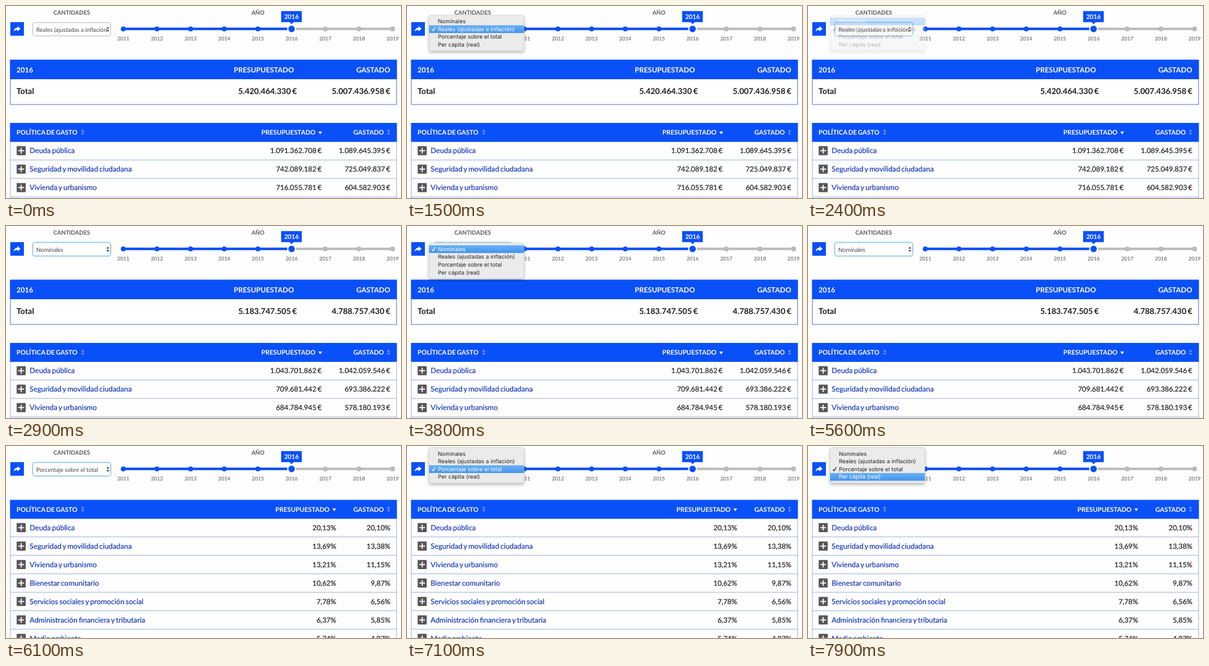
Recreate the animation shown at these times as an HTML page. Size 640x312 px, loop 8 s.

```html
<!DOCTYPE html>
<html lang="es">
<head>
<meta charset="utf-8">
<title>Presupuesto</title>
<style>
  html, body { margin: 0; width: 100%; height: 100%; overflow: hidden; background: #fefefe; }
  svg { display: block; width: 640px; height: 312px; font-family: Lato, sans-serif; text-rendering: geometricPrecision; }
  .table { word-spacing: -.06em; }
  .menu { font-family: Inter, "Liberation Sans", sans-serif; }
</style>
</head>
<body>
<svg id="stage" viewBox="0 0 640 312">
  <defs>
    <linearGradient id="hover" x2="0" y2="1">
      <stop offset="0" stop-color="#69b0f5"/>
      <stop offset="1" stop-color="#4394ee"/>
    </linearGradient>
    <clipPath id="selectClip"><rect x="44" y="27" width="119" height="21"/></clipPath>
    <filter id="shadow" x="-10%" y="-10%" width="120%" height="135%">
      <feDropShadow dx="0" dy="2.5" stdDeviation="2.5" flood-opacity=".3"/>
    </filter>
  </defs>
</svg>
<script>
const BLUE = '#0a50f8', GREY = '#bbb', INK = '#1c1c1c', LINK = '#1738b8';
const LEFT = 6.6, RIGHT = 633.3, WIDTH = RIGHT - LEFT;
const LOOP = 8000, FADE = 150;
const stage = document.getElementById('stage');

function add(parent, tag, attrs = {}, content) {
  const node = document.createElementNS('http://www.w3.org/2000/svg', tag);
  for (const key in attrs) node.setAttribute(key, attrs[key]);
  if (content !== undefined) node.textContent = content;
  parent.append(node);
  return node;
}
const rect = (parent, x, y, width, height, fill, extra) =>
  add(parent, 'rect', { x, y, width, height, fill, ...extra });
const path = (parent, d, fill, extra) => add(parent, 'path', { d, fill, ...extra });

// Text is placed by the vertical centre of its capitals.
const text = (parent, content, x, middle, size, fill, extra) =>
  add(parent, 'text', { x, y: middle + size * .36, 'font-size': size, fill, ...extra }, content);
const BOLD = { 'font-weight': 700 };
const END = { 'text-anchor': 'end' };
const MID = { 'text-anchor': 'middle' };
const thicken = color => ({ stroke: color, 'stroke-width': .2 });

function drawControls() {
  text(stage, 'CANTIDADES', 106.5, 11, 9.4, '#5a5a5a', { ...MID, ...BOLD });
  text(stage, 'AÑO', 408.2, 11, 9.3, '#5a5a5a', { ...MID, ...BOLD });
  rect(stage, 7, 26.2, 22, 22.2, BLUE);
  path(stage, 'M18.6 32.8L23.6 37L18.6 41.2V38.7C15.4 38.6 13.8 39.5 12.6 41.8C12.6 38 14.6 35.4 18.6 35.2Z', '#fff');
}

function drawSlider() {
  const yearX = i => 190 + i * 54.55;
  const current = 5;
  rect(stage, 190, 35.2, 436, 4, GREY);
  rect(stage, 190, 35.2, yearX(current) - 190, 4, BLUE);
  for (let i = 0; i < 9; i++) {
    const cx = yearX(i), isCurrent = i === current;
    add(stage, 'circle', {
      cx, cy: 37.2, r: isCurrent ? 6.3 : 4, fill: i > current ? GREY : BLUE,
      ...(isCurrent && { stroke: '#fff', 'stroke-width': 2 })
    });
    text(stage, 2011 + i, cx, 52.8, 8.5, '#555', MID);
  }
  path(stage, 'M445.8 8.2H479.3V26.2H466L462.7 29.6L459.4 26.2H445.8Z', BLUE);
  text(stage, '2016', 462.6, 17, 10.3, '#fff', { ...MID, ...BOLD });
}

function drawSelect() {
  const ring = rect(stage, 42.8, 26.3, 127.4, 23, 'none', { rx: 4, stroke: '#c4e2f6', 'stroke-width': 1.4 });
  const box = rect(stage, 43.5, 27, 126, 21.6, '#fff', { rx: 3, 'stroke-width': 1 });
  const label = text(stage, '', 49, 38.1, 9.45, '#444', { 'clip-path': 'url(#selectClip)' });
  path(stage, 'M162.7 36.8L165 33.6L167.3 36.8ZM162.7 39L165 42.2L167.3 39Z', '#444');
  return { ring, box, label };
}

function sortArrows(parent, x, y) {
  path(parent, `M${x - 2.6} ${y - 1}l2.6 -3.6l2.6 3.6ZM${x - 2.6} ${y + 1}l2.6 3.6l2.6 -3.6Z`, '#fff', { opacity: .42 });
}

function drawTotals(parent, budget, spent) {
  rect(parent, LEFT + .5, 88, WIDTH - 1, 72, '#fff', { stroke: '#5476bb', 'stroke-width': 1 });
  rect(parent, LEFT, 87.3, WIDTH, 31.7, BLUE);
  const head = (content, x, extra) => text(parent, content, x, 104, 11.6, '#fff', { ...BOLD, ...extra });
  head('2016', 17);
  head('PRESUPUESTADO', 466.5, END);
  head('GASTADO', 622.5, END);
  const cell = (content, x, extra) => text(parent, content, x, 138.7, 13.1, INK, { ...BOLD, ...extra });
  cell('Total', 17);
  cell(budget, 471.3, END);
  cell(spent, 622.8, END);
}

function drawTable(parent, top, budgetEnd, headEnd, rows) {
  const edge = '#9fb4dc';
  rect(parent, LEFT, top, 1, 312 - top, edge);
  rect(parent, RIGHT - 1, top, 1, 312 - top, edge);
  rect(parent, LEFT, top, WIDTH, 30.8, BLUE);
  const middle = top + 15.7;
  const head = (content, x, extra) => text(parent, content, x, middle, 10.45, '#fff', { ...BOLD, ...extra });
  head('POLÍTICA DE GASTO', 17);
  head('PRESUPUESTADO', headEnd, END);
  head('GASTADO', 612.3, END);
  sortArrows(parent, 124.3, middle - .5);
  sortArrows(parent, 619.8, middle - .5);
  path(parent, `M${headEnd + 4.6} ${middle - 1.6}h6l-3 4.4Z`, '#fff');

  rows.forEach(([name, budget, spent], i) => {
    const y = top + 45.1 + i * 30;
    rect(parent, 17.3, y - 7.3, 14.6, 14.6, '#555', { rx: 1 });
    path(parent, `M19.9 ${y}h9.4M24.6 ${y - 4.7}v9.4`, 'none', { stroke: '#fff', 'stroke-width': 1.8 });
    const value = (content, x) => text(parent, content, x, y, 11.5, INK, { ...END, ...thicken(INK) });
    text(parent, name, 38.3, y, 11.8, LINK, thicken(LINK));
    value(budget, budgetEnd);
    value(spent, 622.8);
    rect(parent, LEFT, y + 14.6, WIDTH, 1, edge);
  });
}

const addView = () => add(stage, 'g', { class: 'table' });

function drawAmounts(total, rows) {
  const view = addView();
  drawTotals(view, ...total);
  drawTable(view, 190, 511.5, 501.5, rows);
  return view;
}

function drawShares(rows) {
  const view = addView();
  drawTable(view, 87.5, 535, 524.3, rows);
  return view;
}

const OPTIONS = ['Nominales', 'Reales (ajustadas a inflación)', 'Porcentaje sobre el total', 'Per cápita (real)'];
const ITEM = 12.6;

function drawMenu() {
  const root = add(stage, 'g', { class: 'menu' });
  rect(root, 35.8, 0, 153.6, 57.6, '#ebebeb', { rx: 3, filter: 'url(#shadow)', stroke: '#c4c4c4', 'stroke-width': .5 });
  const bar = rect(root, 35.8, 0, 153.6, ITEM, 'url(#hover)');
  const itemY = i => 3.6 + i * ITEM;
  const labels = OPTIONS.map((option, i) => text(root, option, 50, itemY(i) + ITEM / 2, 9.05, '#222'));
  const check = path(root, 'M-2.6 .6L-.8 2.8L2.8 -3', 'none', { 'stroke-width': 1.2 });
  return { root, bar, labels, check, itemY };
}

drawControls();
drawSlider();
const select = drawSelect();
const views = [
  drawAmounts(['5.183.747.505 €', '4.788.757.430 €'], [
    ['Deuda pública', '1.043.701.862 €', '1.042.059.546 €'],
    ['Seguridad y movilidad ciudadana', '709.681.442 €', '693.386.222 €'],
    ['Vivienda y urbanismo', '684.784.945 €', '578.180.193 €']
  ]),
  drawAmounts(['5.420.464.330 €', '5.007.436.958 €'], [
    ['Deuda pública', '1.091.362.708 €', '1.089.645.395 €'],
    ['Seguridad y movilidad ciudadana', '742.089.182 €', '725.049.837 €'],
    ['Vivienda y urbanismo', '716.055.781 €', '604.582.903 €']
  ]),
  drawShares([
    ['Deuda pública', '20,13%', '20,10%'],
    ['Seguridad y movilidad ciudadana', '13,69%', '13,38%'],
    ['Vivienda y urbanismo', '13,21%', '11,15%'],
    ['Bienestar comunitario', '10,62%', '9,87%'],
    ['Servicios sociales y promoción social', '7,78%', '6,56%'],
    ['Administración financiera y tributaria', '6,37%', '5,85%'],
    ['Medio ambiente', '5,74%', '4,97%']
  ])
];
const menu = drawMenu();

// [start time, value], the last entry reached applies.
const chosenSteps = [[0, 1], [2500, 0], [5700, 2]];
const hoverSteps = [[0, 1], [1900, 0], [4300, 1], [4900, 2], [7600, 3]];
const openings = [[900, 2300], [3500, 5350], [6800, 9000]];
const stepAt = (steps, t) => steps.filter(([start]) => start <= t).pop()[1];

function render(t) {
  const chosen = stepAt(chosenSteps, t);
  const hovered = stepAt(hoverSteps, t);
  views.forEach((view, i) => view.setAttribute('display', i === chosen ? 'inline' : 'none'));

  const focused = t >= openings[0][0];
  select.ring.setAttribute('display', focused ? 'inline' : 'none');
  select.box.setAttribute('stroke', focused ? '#86bde2' : '#b5b5b5');
  select.label.textContent = OPTIONS[chosen];

  const opening = openings.find(([start, end]) => t >= start && t < end + FADE);
  menu.root.setAttribute('display', opening ? 'inline' : 'none');
  if (!opening) return;
  menu.root.setAttribute('opacity', Math.min(1, 1 - (t - opening[1]) / FADE));
  menu.root.setAttribute('transform', `translate(0 ${27.7 - chosen * ITEM})`);
  menu.bar.setAttribute('y', menu.itemY(hovered));
  menu.labels.forEach((label, i) => label.setAttribute('fill', i === hovered ? '#fff' : '#222'));
  menu.check.setAttribute('transform', `translate(43 ${menu.itemY(chosen) + ITEM / 2})`);
  menu.check.setAttribute('stroke', chosen === hovered ? '#fff' : '#222');
}

const startTime = performance.now();
function tick() {
  render((performance.now() - startTime) % LOOP);
  requestAnimationFrame(tick);
}
tick();
</script>
</body>
</html>
```
